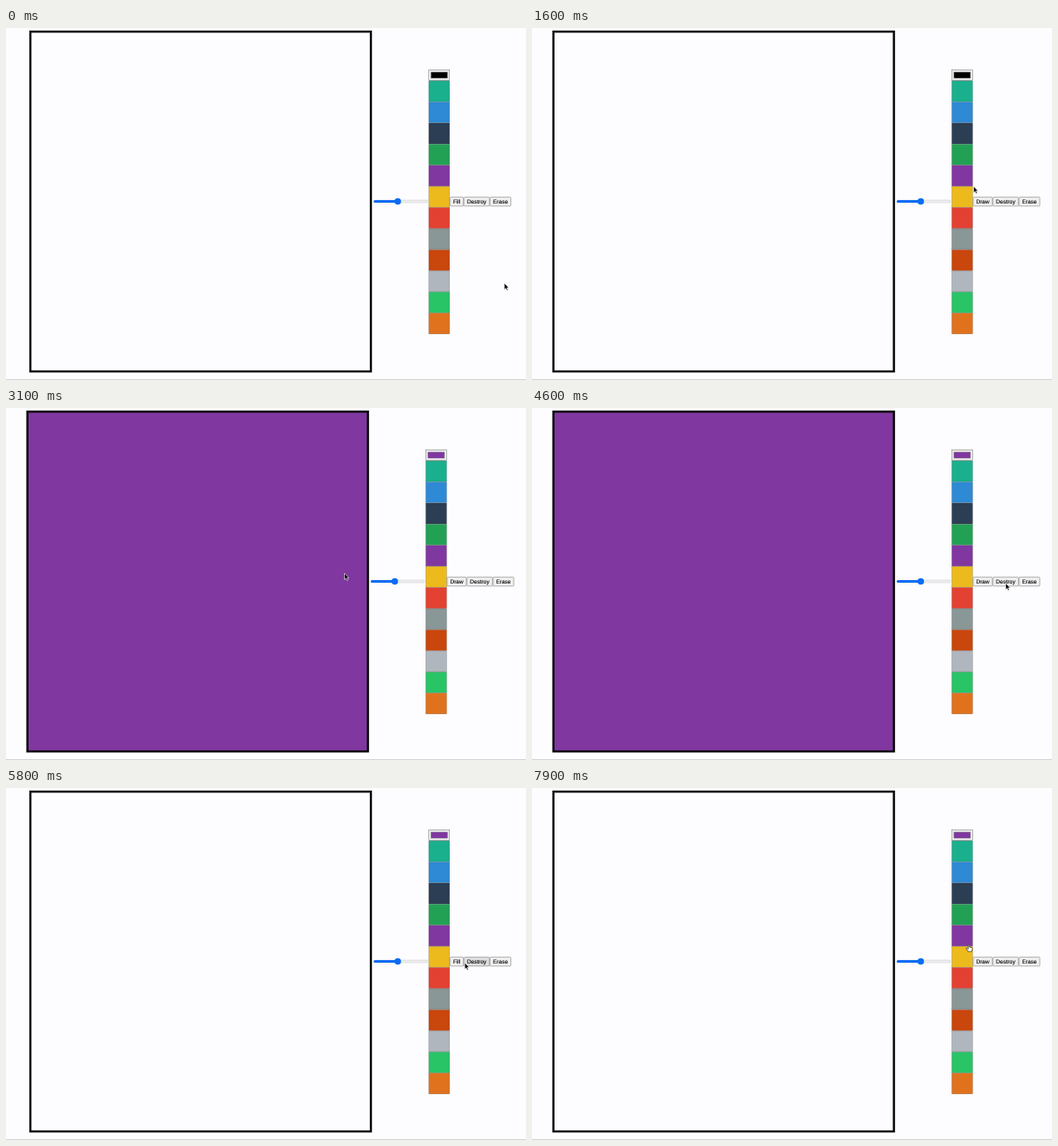
An HTML page for the animation above (8 s loop, 600 by 407 pixels).

```html
<!DOCTYPE html>
<html>
<head>
<meta charset="utf-8">
<style>
  html, body { margin: 0; width: 100%; height: 100%; overflow: hidden; background: #fdfcfe; }
  svg { display: block; }
  text {
    font: 6.5px "Liberation Sans", Arial, sans-serif; text-anchor: middle;
    text-rendering: geometricPrecision; stroke: #000; stroke-width: .12;
  }
  .outline { stroke: #777; stroke-width: .55; }
</style>
</head>
<body>
<svg width="600" height="407" viewBox="0 0 600 407">
  <rect y="406" width="600" height="1" fill="#d3d2d4"/>
  <g id="page">
    <rect id="board" x="24.7" y="4.2" width="392.9" height="392.9" stroke="#000" stroke-width="2.44"/>
    <g id="slider">
      <rect x="421" y="199" width="62" height="3" rx="1.5" fill="#efefef" stroke="#b8b8ba" stroke-width=".4"/>
      <rect x="420.8" y="198.9" width="28" height="3.2" rx="1.6" fill="#0a6cf5"/>
      <circle cx="448.6" cy="200.5" r="3.75" fill="#0a6cf5"/>
    </g>
    <g id="picker" class="outline">
      <rect x="484.4" y="48.4" width="23.9" height="12.2" fill="#f0eff0"/>
      <rect id="chosen" x="486.9" y="51" width="19" height="7"/>
    </g>
    <g id="palette" stroke="#000" stroke-opacity=".3" stroke-width=".5"></g>
    <g id="buttons"></g>
  </g>
  <g id="cursor" stroke-width=".6">
    <path id="arrow" d="M0 0V7.4L1.7 5.9 2.9 8.6 4.2 8 3 5.4H5.2Z" stroke="#fff"/>
    <path id="hand" d="M-.7 .6Q0-.5.7.6V3L3.6 3.7Q4.4 4 4.2 5L3.4 8H-.8L-3 4.8Q-2.8 3.7-1.9 4.3L-.7 5.4Z" fill="#fff" stroke="#111"/>
  </g>
</svg>
<script>
const LOOP = 8000, STEP = 100;
const PAPER = "#fdfcfe", PURPLE = "#8037a0";
const SWATCHES = ["#1ab08e", "#2e8ad4", "#2c3e53", "#22a154", PURPLE, "#ecba1c",
  "#e34132", "#8a9797", "#c9460c", "#b0b6bd", "#28c466", "#e0721e"];
const SIZE = 24.42, LEFT = 484.2, RIGHT = LEFT + SIZE;
const TOP = 195.6, HEIGHT = 10.3, PADDING = 7.7;

// Where the pointer rests, from when until when
const STOPS = [
  { from: 0, to: 0, x: 575, y: 295 },
  { from: 600, to: 1200, x: 520, y: 203 },
  { from: 1600, to: 1600, x: 509.5, y: 183 },
  { from: 1900, to: 2300, x: 498, y: 172 },
  { from: 2900, to: 3300, x: 390.5, y: 191 },
  { from: 4500, to: 4500, x: 547, y: 208 },
  { from: 4600, to: 5000, x: 546.5, y: 202.5 },
  { from: 5300, to: 5500, x: 522, y: 202 },
  { from: 5700, to: 5700, x: 531, y: 202 },
  { from: 6100, to: 6400, x: 520, y: 202 },
  { from: 7700, to: 7700, x: 506, y: 220 },
  { from: 7900, to: LOOP, x: 504, y: 181 }
];

const $ = id => document.getElementById(id);
function set(el, attrs) {
  for (const key in attrs) el.setAttribute(key, attrs[key]);
  return el;
}
function add(parent, tag, attrs) {
  const el = document.createElementNS("http://www.w3.org/2000/svg", tag);
  return parent.appendChild(set(el, attrs));
}
const between = (t, from, to) => t >= from && t < to;
const smooth = k => k * k * (3 - 2 * k);

function pointAt(t) {
  const i = STOPS.findIndex(stop => t <= stop.to), b = STOPS[i];
  if (t >= b.from) return b;
  const a = STOPS[i - 1], k = smooth((t - a.to) / (b.from - a.to));
  return { x: a.x + (b.x - a.x) * k, y: a.y + (b.y - a.y) * k };
}

SWATCHES.forEach((fill, i) => add($("palette"), "rect", {
  x: LEFT + .2, y: 61.1 + i * SIZE, width: SIZE - .4, height: SIZE - .4, fill
}));

function makeButton(name) {
  const group = add($("buttons"), "g", {});
  const box = add(group, "rect", { x: .3, y: TOP, height: HEIGHT, rx: 1, class: "outline" });
  const label = add(group, "text", { y: 203 });
  label.textContent = name;
  const width = label.getComputedTextLength() + PADDING;
  set(box, { width: width - .6 });
  set(label, { x: width / 2 });
  return { group, box, width };
}
const [fillButton, drawButton, destroy, erase] = ["Fill", "Draw", "Destroy", "Erase"].map(makeButton);

function render(t) {
  const filling = between(t, 1000, 5400) || t >= 6200;
  const toggle = filling ? drawButton : fillButton;
  const shift = (drawButton.width - toggle.width) / 2; // the page stays centred
  const { x, y } = pointAt(t);
  const seen = pointAt(Math.max(0, t - STEP)); // hover shows one step late

  set($("page"), { transform: `translate(${shift} 0)` });
  set($("board"), { fill: between(t, 3100, 4700) ? PURPLE : PAPER });
  set($("chosen"), { fill: t < 2100 ? "#000" : PURPLE });
  fillButton.group.style.display = filling ? "none" : "";
  drawButton.group.style.display = filling ? "" : "none";

  let left = RIGHT;
  for (const { group, box, width } of [toggle, destroy, erase]) {
    const hover = between(seen.x - shift, left, left + width) && between(seen.y, TOP, TOP + HEIGHT);
    set(group, { transform: `translate(${left} 0)` });
    set(box, { fill: hover ? "#dededf" : "#efeff0" });
    left += width;
  }

  const onPalette = between(x - shift, LEFT, RIGHT) && between(y, 48, 354);
  $("arrow").style.display = onPalette ? "none" : "";
  $("hand").style.display = onPalette ? "" : "none";
  set($("cursor"), { transform: `translate(${x} ${y})` });
}

const start = performance.now();
function tick() {
  const t = (performance.now() - start) % LOOP;
  render(Math.floor(t / STEP) * STEP);
  requestAnimationFrame(tick);
}
tick();
</script>
</body>
</html>
```
